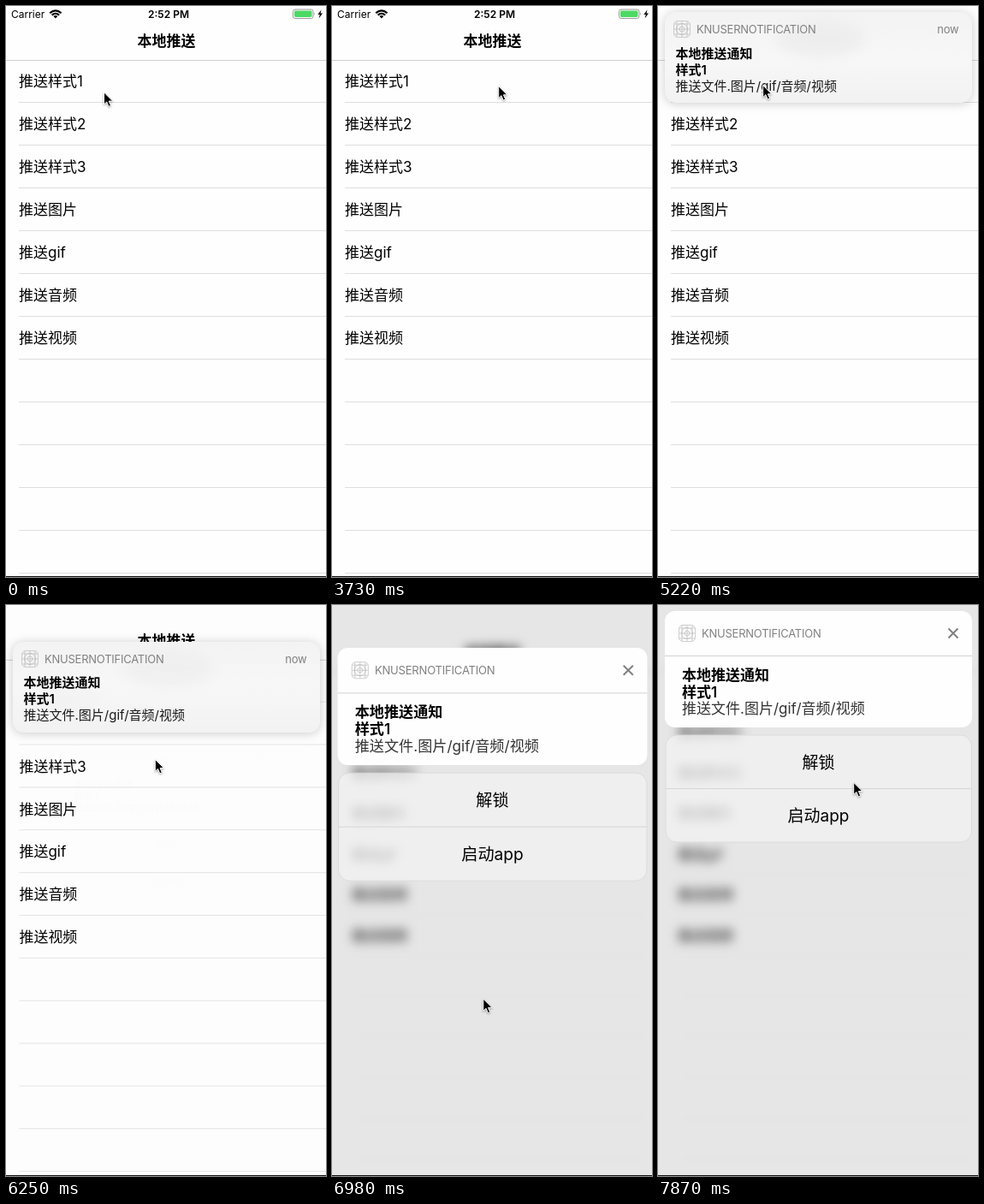
Write an HTML page that moves like this. It is 374 px wide and 667 px high and loops after 8000 ms.

```html
<!DOCTYPE html>
<html lang="zh-CN">
<head>
<meta charset="utf-8">
<title>本地推送</title>
<style>
html, body { margin: 0; width: 100%; height: 100%; overflow: hidden; background: #fefefe; }
svg { display: block; width: 374px; height: 667px; }
text { font-family: Inter, "Noto Sans CJK SC", "Noto Sans CJK", sans-serif; white-space: pre; }
.bold { font-weight: 600; }
.row { font-size: 17px; }
.app { font-size: 13px; fill: #808080; letter-spacing: -.24px; }
.soft { filter: blur(7px); }
#banner .plate { filter: drop-shadow(0 1px 6px rgba(0,0,0,.2)); }
#cursor { filter: drop-shadow(0 1px 1px rgba(0,0,0,.35)); }
</style>
</head>
<body>
<svg viewBox="0 0 374 667" xmlns="http://www.w3.org/2000/svg">
  <defs>
    <g id="icon" fill="none" stroke="#b9b9b9" stroke-width=".7">
      <rect x=".5" y=".5" width="19" height="19" rx="4.5"/>
      <path d="M4 1V19M10 1V19M16 1V19M1 4H19M1 10H19M1 16H19"/>
      <circle cx="10" cy="10" r="3"/><circle cx="10" cy="10" r="6.5"/>
    </g>
    <linearGradient id="plateFill" x1="0" y1="0" x2="0" y2="1">
      <stop offset="0" stop-color="#f3f3f3"/>
      <stop offset=".5" stop-color="#f7f7f7"/>
      <stop offset="1" stop-color="#f2f2f2"/>
    </linearGradient>
  </defs>

  <rect width="374" height="667" fill="#fefefe"/>
  <g id="page">
    <rect x="-80" y="-80" width="534" height="827" fill="#fefefe"/>
    <text class="row bold" x="187.5" y="47" text-anchor="middle">本地推送</text>
    <rect x="-20" y="63" width="414" height="1" fill="#d0d0d0"/>
    <g id="lines" fill="#dedee0"></g>
    <g id="rows"></g>
  </g>

  <g id="status">
    <text x="6" y="14" font-size="12">Carrier</text>
    <g fill="none" stroke="#000" stroke-width="2.1">
      <path d="M51.2 8.2Q57.9 2.4 64.6 8.2M53.6 10.6Q57.9 6.9 62.2 10.6"/>
    </g>
    <path d="M55.5 12Q57.9 10 60.3 12L57.9 14.5Z"/>
    <text class="bold" x="190" y="14" font-size="12" text-anchor="middle">2:52 PM</text>
    <rect x="335.5" y="4" width="23.5" height="10.5" rx="2.6" fill="none" stroke="#999"/>
    <rect x="337" y="5.5" width="20.5" height="7.5" rx="1.4" fill="#4cd964"/>
    <path d="M360.3 7.3Q362 9.2 360.3 11.2Z" fill="#999"/>
    <path d="M368.6 4.2L364.4 9.9H366.8L365.6 14.4L370 8.5H367.5Z"/>
  </g>

  <rect id="dim" width="374" height="667"/>

  <g id="card">
    <rect x="9" y="152" width="357.5" height="125" rx="13" fill="#f4f4f4" fill-opacity=".7" stroke="#d9d9d9" stroke-width=".8"/>
    <rect x="9" y="214" width="357.5" height="1" fill="#d6d6d6"/>
    <rect x="8" y="7" width="359" height="136" rx="12" fill="#fefefe"/>
    <rect x="8" y="59" width="359" height="1" fill="#d2d2d2"/>
    <use href="#icon" x="24" y="23"/>
    <text class="app" x="51" y="38">KNUSERNOTIFICATION</text>
    <path d="M339.5 27.5L350.5 38.5M350.5 27.5L339.5 38.5" stroke="#808080" stroke-width="2"/>
    <g font-size="17">
      <text class="bold" x="28" y="87.5">本地推送通知</text>
      <text class="bold" x="28" y="107.5">样式1</text>
      <text x="28" y="127.3" fill="#333">推送文件.图片/gif/音频/视频</text>
    </g>
    <g font-size="19" text-anchor="middle">
      <text x="187.5" y="190.8">解锁</text>
      <text x="187.5" y="252.8">启动app</text>
    </g>
  </g>

  <g id="banner">
    <rect class="plate" x="8" y="7" width="359" height="106" rx="13" fill="url(#plateFill)"/>
    <ellipse id="tintTop" class="soft" cx="190" cy="38" rx="52" ry="22" fill="#ebebeb"/>
    <ellipse id="tintLeft" class="soft" cx="65" cy="72" rx="44" ry="28" fill="#ebebeb"/>
    <use href="#icon" x="18" y="17"/>
    <text class="app" x="45" y="32">KNUSERNOTIFICATION</text>
    <text class="app" x="351.5" y="32" text-anchor="end">now</text>
    <g font-size="15">
      <text class="bold" x="20.5" y="60.5">本地推送通知</text>
      <text class="bold" x="20.5" y="79.5">样式1</text>
      <text x="20.5" y="98.5" fill="#1a1a1a">推送文件.图片/gif/音频/视频</text>
    </g>
  </g>

  <rect y="666" width="374" height="1" fill="#111"/>
  <path id="cursor" d="M0 0V14.2L3.2 11.2L5.5 16.6L8 15.5L5.7 10.3H10.2Z" stroke="#fff" stroke-width="1" stroke-linejoin="round"/>
</svg>

<script>
const LOOP = 8000;
const $ = id => document.getElementById(id);
const mix = (a, b, p) => a + (b - a) * p;
const easeOut = p => 1 - (1 - p) ** 2;
const easeBoth = p => (1 - Math.cos(Math.PI * p)) / 2;

// Progress in n hard steps: the first at time a, the last at time b.
function stepped(t, a, b, n) {
  if (t < a) return 0;
  if (n < 2) return 1;
  return Math.min(n, Math.floor((t - a) / (b - a) * (n - 1) + 1.05)) / n;
}

// Pointer moves: start, end, steps, x, y, easing
const moves = [
  [440, 590, 2, 102, 100.5],
  [1640, 1780, 2, 196.7, 93.5],
  [3730, 3730, 1, 194.7, 93.5],
  [4920, 5220, 3, 122.7, 92.5],
  [5510, 5810, 3, 173.5, 77],
  [6100, 6840, 6, 176.8, 490, easeBoth],
  [6980, 6980, 1, 176.8, 460],
  [7130, 7130, 1, 181, 271],
  [7280, 7870, 5, 228.7, 207.3, easeOut]
];

function pointer(t) {
  let x = 114.5, y = 100.8;
  for (const [a, b, n, toX, toY, ease = p => p] of moves) {
    const p = ease(stepped(t, a, b, n));
    x = mix(x, toX, p);
    y = mix(y, toY, p);
  }
  return [x, y];
}

function build() {
  const labels = ['样式1', '样式2', '样式3', '图片', 'gif', '音频', '视频'];
  $('rows').innerHTML = labels.map((s, i) =>
    `<text class="row" x="15" y="${94.3 + 50 * i}">推送${s}</text>`).join('');
  $('lines').innerHTML = Array.from({ length: 12 }, (_, i) =>
    `<rect x="15" y="${112 + 50 * i}" width="365" height="1"/>`).join('');
}

function show(id, on) {
  $(id).style.display = on ? '' : 'none';
}

function placeCard(scale, top, opacity) {
  $('card').setAttribute('transform',
    `translate(187.5 ${top}) scale(${scale}) translate(-187.5 -7)`);
  $('card').setAttribute('opacity', opacity);
}

function draw(t) {
  const enter = stepped(t, 4920, 5220, 3);
  const drag = easeBoth(stepped(t, 6100, 6840, 6));
  const open = t >= 6980;

  // Page behind: shrinks, blurs and darkens
  const scale = open ? 0.952 : 1 - 0.012 * drag;
  const blur = open ? 6.5 : 1.5 * drag;
  $('page').setAttribute('transform',
    `translate(187 346) scale(${scale}) translate(-187 -346)`);
  $('page').style.filter = blur > 0 ? `blur(${blur}px)` : 'none';
  $('lines').setAttribute('opacity', open ? 0.3 : 1 - 0.8 * drag);
  $('dim').setAttribute('opacity', open ? 0.095 : 0.014 * drag);
  show('status', enter === 0);

  // Banner
  const drop = 108.5 * (1 - (1 - drag) ** 1.4);
  show('banner', enter > 0 && !open);
  $('banner').setAttribute('transform',
    `translate(0 ${-120 * (1 - easeOut(enter)) + drop})`);
  $('tintTop').setAttribute('opacity', 0.7 * (1 - drag));
  $('tintLeft').setAttribute('opacity', 0.8 * drag);

  // Expanded card, faint while dragging, then settling at the top
  show('card', open || drag > 0);
  if (open) {
    const left = t < 7130 ? 1 : t < 7280 ? 0.12 : t < 7430 ? 0.02 : 0;
    placeCard(1 + 0.008 * left, 7 + 43 * left, 1);
  } else {
    placeCard(0.677, 159.8, 0.14 * drag ** 3);
  }

  const [x, y] = pointer(t);
  $('cursor').setAttribute('transform', `translate(${x} ${y})`);
}

build();
draw(0);
let start;
function tick(now) {
  start ??= now;
  draw((now - start) % LOOP);
  requestAnimationFrame(tick);
}
requestAnimationFrame(tick);
</script>
</body>
</html>
```
